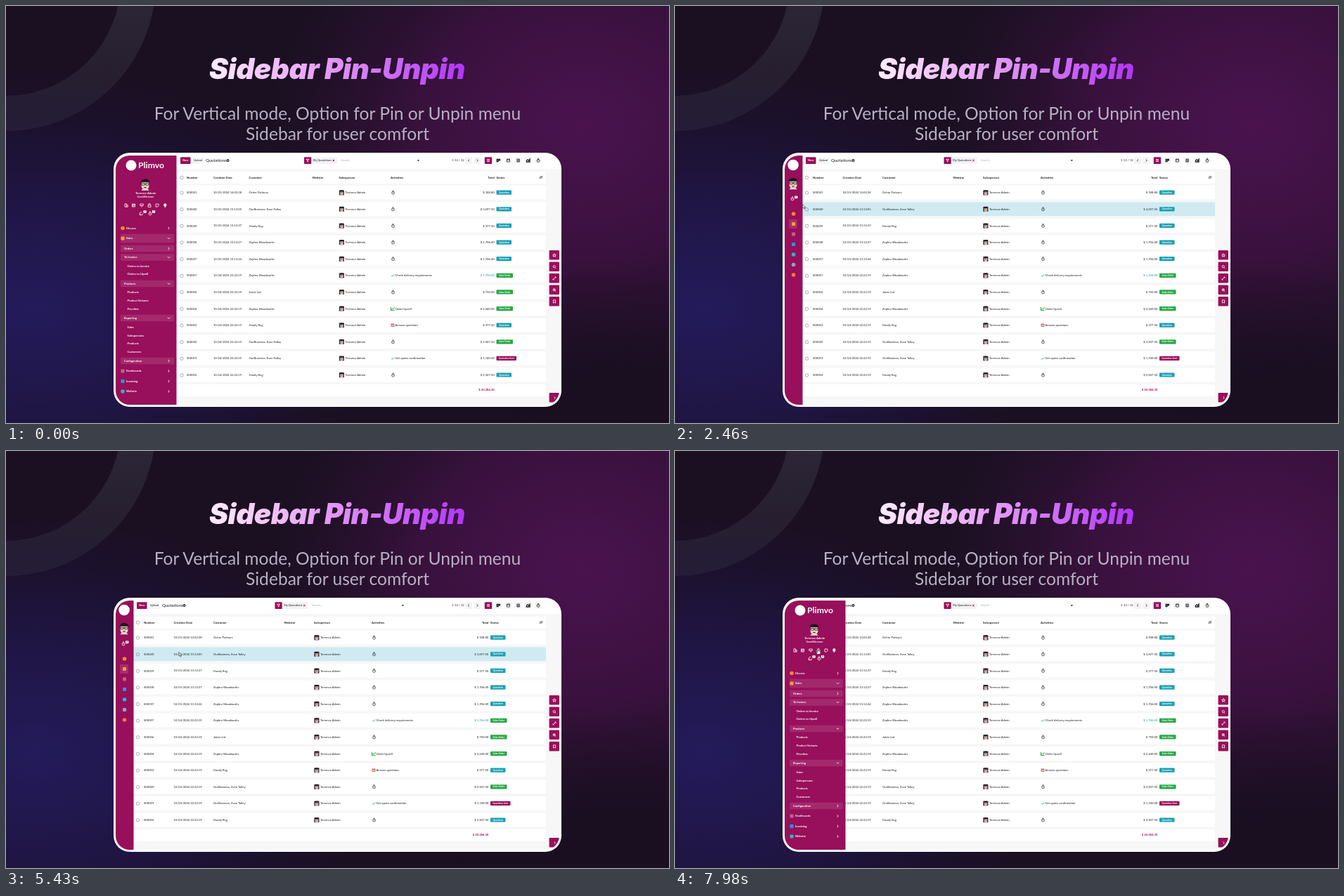
An HTML page that plays this animation: 943 px wide and 594 px high, repeating every 8000 ms.

```html
<!DOCTYPE html>
<html lang="en">
<head>
<meta charset="utf-8">
<title>Sidebar Pin-Unpin</title>
<style>
html, body { margin: 0; width: 100%; height: 100%; overflow: hidden; background: #1b1022; }
svg { display: block; width: 100vw; height: 100vh; font-family: Lato, sans-serif; }
.title { font: italic 900 40.5px Inter, sans-serif; letter-spacing: -.45px; }
.sub { font-size: 24.6px; fill: #b7b0c4; }
.b { font-weight: 700; }
.e { text-anchor: end; }
.m { text-anchor: middle; }
#ui { fill: #1c1c22; color: #222; }
.side { fill: #fff; color: #fff; }
</style>
</head>
<body>
<svg viewBox="0 0 943 594">
  <defs>
    <radialGradient id="plum"><stop offset="0" stop-color="#4a134f"/><stop offset=".5" stop-color="#461249" stop-opacity=".72"/><stop offset="1" stop-color="#34103a" stop-opacity="0"/></radialGradient>
    <radialGradient id="blue"><stop offset="0" stop-color="#241b5c"/><stop offset=".5" stop-color="#211853" stop-opacity=".65"/><stop offset="1" stop-color="#1b1040" stop-opacity="0"/></radialGradient>
    <radialGradient id="dark"><stop offset="0" stop-color="#180e20" stop-opacity=".6"/><stop offset="1" stop-color="#180e20" stop-opacity="0"/></radialGradient>
    <linearGradient id="ink" gradientUnits="userSpaceOnUse" x1="292" x2="651" y1="0" y2="0"><stop offset="0" stop-color="#ffebfd"/><stop offset=".45" stop-color="#e49cf3"/><stop offset="1" stop-color="#b136f8"/></linearGradient>
    <linearGradient id="ring" x1="0" y1="0" x2="0" y2="1"><stop offset=".5" stop-color="#84969c" stop-opacity=".17"/><stop offset="1" stop-color="#84969c" stop-opacity=".09"/></linearGradient>
    <clipPath id="screen"><rect x="156" y="213" width="631" height="355" rx="20"/></clipPath>
    <clipPath id="panel"><rect id="panelBox" x="156" y="213" height="355"/></clipPath>
    <g id="face">
      <path d="M-5 7.5C-4.5 4.5 4.5 4.5 5 7.5z" fill="#e9e4ea"/>
      <path d="M-4.9-3h9.8v4.5c0 6.4-9.8 6.4-9.8 0z" fill="#f2d3bd"/>
      <path d="M-5.8-.5C-8-9.5 8-9.5 5.8-.5L4.6-3.4H-4.6z" fill="#1a181e"/>
      <path d="M-4.4-1.6h3.6v2.2h-3.6zM.8-1.6h3.6v2.2H.8zM-.8-1H.8" fill="#fff" stroke="#222" stroke-width=".8"/>
      <path d="M-2.2 3.4Q0 2.4 2.2 3.4Q0 5.4-2.2 3.4" fill="#4a2d25"/>
    </g>
  </defs>
  <rect width="943" height="594" fill="#1b1022"/>
  <ellipse cx="820" cy="170" rx="440" ry="370" fill="url(#plum)"/>
  <ellipse cx="40" cy="430" rx="500" ry="340" fill="url(#blue)"/>
  <ellipse cx="850" cy="520" rx="260" ry="150" fill="url(#dark)"/>
  <circle cx="0" cy="-35" r="188" fill="none" stroke="url(#ring)" stroke-width="50"/>
  <text class="title m" x="471" y="104" fill="url(#ink)">Sidebar Pin-Unpin</text>
  <text class="sub m" x="471.5" y="162">For Vertical mode, Option for Pin or Unpin menu</text>
  <text class="sub m" x="471.5" y="191">Sidebar for user comfort</text>
  <rect x="153" y="209" width="637" height="362" rx="23" fill="#fff"/>
  <g id="ui" clip-path="url(#screen)"></g>
</svg>
<script>
const $ = id => document.getElementById(id);
const PLUM = '#980f5b', TEAL = '#1a9fb5', GREEN = '#28a745';

const text = (x, y, s, size = 4.2, cls = '', fill = '') =>
  `<text x="${x}" y="${y + size * .35}" font-size="${size}" class="${cls}" ${fill && `fill="${fill}"`}>${s}</text>`;
const rect = (x, y, w, h, fill, r = 0) =>
  `<rect x="${x}" y="${y}" width="${w}" height="${h}" rx="${r}" fill="${fill}"/>`;
const dot = (x, y, r, fill) => `<circle cx="${x}" cy="${y}" r="${r}" fill="${fill}"/>`;
const icon = (x, y, d, color = 'currentColor', w = .8) =>
  `<path transform="translate(${x} ${y})" d="${d}" fill="none" stroke="${color}" stroke-width="${w}"/>`;
const face = (x, y, k) => `<use href="#face" transform="translate(${x} ${y}) scale(${k})"/>`;
// Group that slides right by d while the sidebar is pinned
const slide = (d, s) => `<g class="slide" data-d="${d}">${s}</g>`;

const right = 'M-.9-1.6L.8 0L-.9 1.6', left = 'M.9-1.6L-.8 0L.9 1.6', down = 'M-1.6-.8L0 .8L1.6-.8';
const clock = 'M-.8-2.6h1.6M0-2.6v.8M2 .4a2 2 0 1 1-4 0a2 2 0 1 1 4 0M0 .5v-1.2';
const check = 'M-1.7 0L-.5 1.3L1.9-1.4', ring = 'M2.2 0a2.2 2.2 0 1 1-4.4 0a2.2 2.2 0 1 1 4.4 0';
const lens = 'M1.3-.3a1.6 1.6 0 1 1-3.2 0a1.6 1.6 0 1 1 3.2 0M.9 1L2.2 2.2';
const box = 'M-2-2h4v4h-4z', lines = 'M-2-1.4h4M-2 0h4M-2 1.4h4';
const star = 'M0-2.4L.7-.7L2.4-.6L1 .5L1.5 2.2L0 1.2L-1.5 2.2L-1 .5L-2.4-.6L-.7-.7z';
const lockBody = 'M-2-.4h4v2.8h-4zM-1.2-.4v-1.1a1.2 1.2 0 0 1 2.4 0';

// ---- Table ----
const buyers = {
  A: 'Ochre Parlours', Y: 'OurBusiness, Evan Tolley', R: 'Handy Rug', Z: 'Zephra Woodworks', J: 'Joists Ltd'
};
const early = '10/24/2024 22:22:19';
const rows = [
  ['41', '14:02:38', 'A', '188.80'], ['40', '13:13:05', 'Y', '3,697.50'],
  ['39', '13:12:37', 'R', '377.50'], ['38', '13:12:27', 'Z', '1,706.00'],
  ['37', '13:12:24', 'Z', '1,706.00'], ['07', '', 'Z', '1,706.00', 1, 'Check delivery requirements'],
  ['06', '', 'J', '750.00', 1], ['04', '', 'Z', '2,240.00', 1, 'Order Upsell'],
  ['03', '', 'R', '377.50', 0, 'Answer questions'], ['20', '', 'Y', '2,947.50', 1],
  ['19', '', 'Y', '1,740.00', 2, 'Get quote confirmation'], ['02', '', 'R', '2,947.50', 0]
];
const badges = [['Quotation', 21.5, TEAL], ['Sales Order', 23.5, GREEN], ['Quotation Sent', 28.5, PLUM]];
const rowY = i => 265.8 + i * 23.62;
const column = (d, x, name, cell, cls = '') =>
  slide(d, text(x, 244, name, 4.3, 'b ' + cls) + rows.map((r, i) => cell(r, rowY(i), i)).join(''));

function activity(note, y) {
  if (!note) return icon(523.5, y, clock, '#222', .7);
  const mark = note[0] == 'O' ? icon(523, y, 'M-2.6-2.4v4.8h5.2M-2 1.6L-.4-.4L.8.6L2.6-2', GREEN, 1)
    : note[0] == 'A' ? icon(523, y, 'M-2-1.8h4v3.6h-4zL0 .3L2-1.8', '#b5413c')
    : icon(523, y, check, '#178a54');
  return mark + text(526.5, y, note);
}

const table = rect(156, 213, 631, 355, '#f7f7f8') + rect(156, 213, 631, 19, '#fff') +
  rect(156, 236, 612, 17, '#fff') +
  rows.map((r, i) => `<rect class="row" x="156" y="${rowY(i) - 10}" width="612" height="19.8" fill="#fff"/>`).join('') +
  rect(156, 539, 612, 17, '#fff') +
  column(62.5, 187.5, '', (r, y) => icon(187.5, y + .3, ring, '#777', .6)) +
  slide(62.5, icon(187.5, 244.3, ring, '#777', .6)) +
  column(61, 196, 'Number', (r, y) => text(196, y, 'S000' + r[0])) +
  column(56.5, 238.5, 'Creation Date', (r, y) => text(238.5, y, r[1] ? '10/25/2024 ' + r[1] : early, 4.1)) +
  column(50.5, 295, 'Customer', (r, y) => text(295, y, buyers[r[2]])) +
  column(40, 395.5, 'Website', () => '') +
  column(35.5, 438, 'Salesperson', (r, y) => rect(438.3, y - 3.6, 7.2, 7.2, '#45323f', 1) + face(442, y, .46) + text(447, y, 'Terrence Admin')) +
  column(27, 520, 'Activities', (r, y) => activity(r[5], y)) +
  column(8.5, 686.3, 'Total', (r, y, i) => text(686.3, y, '$ ' + r[3], 4.2, 'e', i == 5 ? '#16979f' : ''), 'e') +
  column(8.5, 689, 'Status', (r, y) => {
    const [name, w, fill] = badges[r[4] || 0];
    return rect(689, y - 3.2, w, 6.2, fill, 1) + text(689 + w / 2, y - .1, name, 3.2, 'b m', '#fff');
  }) +
  slide(8.5, text(686.3, 547, '$ 20,384.30', 4.2, 'b e', PLUM)) +
  icon(761, 244, 'M-2-.9h4M1-2L2-.9M2 .9h-4M-1 2L-2 .9', '#222', .7);

// ---- Toolbar ----
const toolbar = slide(62, rect(186, 215.3, 14.5, 9.6, PLUM, 1) + text(193.2, 220, 'New', 4, 'b m', '#fff') +
    rect(203, 215.3, 16, 9.6, '#f6f6f7', 1) + text(211, 220, 'Upload', 4, 'm') + text(222, 220, 'Quotations', 6) +
    icon(253.5, 220, 'M1.4 0a1.4 1.4 0 1 1-2.8 0a1.4 1.4 0 1 1 2.8 0', '#222', 1.2)) +
  slide(41.5, rect(382.5, 215.3, 47, 9.6, '#f3f3f5', 1) + rect(382.5, 215.3, 10.2, 9.6, PLUM, 1) +
    icon(387.6, 220, 'M-2-1.8h4L.4.3v1.8L-.4 1.5V.3z', '#fff') + text(395, 220, 'My Quotations', 4) +
    icon(424.4, 220, 'M-1.2-1.2L1.2 1.2M1.2-1.2L-1.2 1.2', PLUM, 1) + text(435, 220, 'Search...', 4, '', '#aaa')) +
  slide(22, '<path d="M562.6 219.3h3.4l-1.7 2z"/>') +
  text(634, 220, '1-12 / 12', 4.2) +
  [[658, left], [670.5, right]].map(([x, d]) => rect(x - 5, 215.3, 10, 9.6, '#f3f3f5', 1) + icon(x, 220, d, '#333')).join('') +
  [lines, 'M-2-1.5h1.8v3H-2zM.6-1.5h1.6v1.4H.6z', box + 'M-2-1h4', 'M-1.8-2h3.6v4h-3.6zM-1-1h2M-1 .2h2M-1 1.2h2', 'M-2.4 2V0L-.8-1.2L.7.2L2.2-1.8V2z', clock]
    .map((d, i) => {
      const x = 686 + i * 14.2;
      return rect(x - 5.2, 215.3, 10.4, 9.6, i ? '#f6f6f7' : PLUM, 1) + icon(x, 220, d, i ? '#222' : '#fff', i == 1 || i == 4 ? 1.3 : .8);
    }).join('');

const tools = [star, lens, 'M-2 2L2-2M.4-2H2V-.4M-.4 2H-2V.4', lens + 'M-1.1-.3h1.6M-.3-1.1v1.6', 'M-1.6-2.2h3.2v4.4L0 .9L-1.6 2.2z']
  .map((d, i) => rect(772.6, 348 + i * 16.5, 14.4, 13.4, PLUM, 1) + icon(780, 355 + i * 16.5, d, '#fff')).join('') +
  rect(772.6, 551, 14.4, 13.4, PLUM, 1) + icon(780.5, 558, right, '#fff');

// ---- Sidebar ----
const apps = [['#f58a1f', 1], ['#f6a12a'], ['#b9667f'], ['#1d9be4'], ['#2cb6c6', 1], ['#83a7c9', 1], ['#ef7d32', 1]];
const app = (x, y, i) => apps[i][1] ? dot(x, y, 2.8, apps[i][0]) : rect(x - 2.5, y - 2.5, 5, 5, apps[i][0], .8);
const badge = (x, y) => rect(x - 2.2, y - 2, 4.4, 4, '#fff', 1.4) + text(x, y, '2', 3, 'b m', PLUM);

// Each entry: y, label, level, open
const menu = [
  [316.5, 'Discuss', 0], [331, 'Sales', 0, 1], [345.5, 'Orders', 1], [358, 'To Invoice', 1, 1],
  [370.5, 'Orders to Invoice', 2], [382, 'Orders to Upsell', 2], [395.5, 'Products', 1, 1],
  [408, 'Products', 2], [420, 'Product Variants', 2], [432, 'Pricelists', 2], [444.5, 'Reporting', 1, 1],
  [458, 'Sales', 2], [469.5, 'Salespersons', 2], [481, 'Products', 2], [492.5, 'Customers', 2],
  [505.5, 'Configuration', 1], [520, 'Dashboards', 0], [534.5, 'Invoicing', 0], [549, 'Website', 0]
];
let appNo = 0;
const menuItem = ([y, label, level, open]) => {
  const h = level ? 9.4 : 12.5;
  return (level == 1 || open ? rect(163, y - h / 2, 76, h, 'rgba(255,255,255,.11)', 1) : '') +
    (level ? '' : app(166, y, appNo++)) + text([171, 168, 172.5][level], y, label, 4.1, 'b') +
    (level < 2 ? icon(231.5, y, open ? down : right, '#fff', .9) : '');
};

const expanded = dot(178, 227, 7.5, '#fff') + text(188, 226.3, 'Plimvo', 12.2, 'b') + face(198, 254.5, 1.1) +
  text(198.5, 266.2, 'Terrence Admin', 4.2, 'b m') + text(198.5, 271.6, 'Good Afternoon', 3.3, 'b m') +
  icon(171, 284, 'M-2 2.2v-4.4h2.4v4.4zM.4-.6H2.2v2.8H.4') + icon(181.5, 284, box + 'M-2-.6h4M-.4-.6v2.6') +
  icon(193, 284, 'M-2.2-2h4.4v2.4h-4.4zM0 .4v2.2') +
  `<g id="shut">${icon(204, 284, lockBody + 'v1.1')}</g><g id="open">${icon(204, 284, lockBody)}</g>` +
  icon(215, 284, 'M-2-2h4v2.6L.6 2H-2z') +
  dot(226.3, 283.4, 2.1, '#fff') + rect(225.5, 285, 1.6, 1.8, '#fff') +
  icon(192.5, 295.5, 'M2.2 0a2.2 2.2 0 1 1-1.5-2M-2.2 0v2.2H0') + badge(197.6, 293) +
  icon(205, 295.5, clock) + badge(210, 293) + menu.map(menuItem).join('');

const collapsed = dot(0, 226.5, 7.8, '#fff') + face(0, 253, 1.1) + icon(-1, 274.5, clock, '#fff') + badge(4.2, 272.3) +
  rect(-6, 304, 12, 13, 'rgba(255,255,255,.13)', 1) + apps.map((a, i) => app(.5, 296 + i * 14.5, i)).join('');

$('ui').innerHTML = table + toolbar + tools +
  `<g class="side" clip-path="url(#panel)">${rect(156, 213, 90, 355, PLUM)}<g id="wide">${expanded}</g><g id="slim">${collapsed}</g></g>` +
  `<g id="cursor" stroke="#222" stroke-width=".6" stroke-linejoin="round" fill="#fff">
    <path id="arrow" d="M0 0V5.6L1.4 4.4L2.3 6.5L3.2 6.1L2.3 4.1H4.1z"/>
    <path id="hand" d="M-.7.6Q0-.5.7.6V3Q2 2.6 3.4 3.6V5.6L2.6 7.6H-1L-2.6 5Q-2.4 4-1.5 4.6L-.7 5z"/></g>`;

// ---- Motion ----
const path = [ // time, x, y of the cursor tip
  [90, 420, 400], [760, 203.5, 282], [1200, 203.5, 282], [1470, 268.5, 289.5], [1680, 292, 289],
  [1950, 292, 289], [2460, 181.5, 282.5], [2900, 190, 284], [4080, 192, 284], [4740, 192, 284],
  [4980, 243, 286.5], [5150, 270, 288], [5330, 270, 288], [5620, 184, 283], [5850, 181, 282],
  [6130, 181, 282], [6420, 250, 285], [6600, 260.5, 285], [6800, 264, 285], [7160, 180, 284],
  [7600, 203.5, 282], [8000, 203.5, 282]
];
const toggles = [[-500, 1], [1500, 0], [2480, 1], [5010, 0], [5560, 1], [6380, 0], [7130, 1]]; // time, open
const clamp = v => Math.max(0, Math.min(1, v));
const smooth = v => v * v * (3 - 2 * v);
const show = (id, on) => $(id).setAttribute('visibility', on ? 'visible' : 'hidden');
const slides = document.querySelectorAll('.slide');
const hoverRow = document.querySelectorAll('.row')[1];

function cursorAt(t) {
  const i = Math.max(1, path.findIndex(k => k[0] > t));
  const [a, b] = [path[i - 1], path[i]];
  const k = smooth(clamp((t - a[0]) / (b[0] - a[0])));
  return [a[1] + (b[1] - a[1]) * k, a[2] + (b[2] - a[2]) * k];
}

function draw() {
  const t = performance.now() % 8000;
  const pinned = 1 - smooth(clamp((t - 860) / 240));
  slides.forEach(g => g.setAttribute('transform', `translate(${g.dataset.d * pinned} 0)`));

  const [start, open] = toggles.filter(k => k[0] <= t).pop();
  const done = 1 - (1 - clamp((t - start) / 300)) ** 2;
  const width = 25.5 + 61 * (open ? done : 1 - done);
  $('panelBox').setAttribute('width', width);
  $('slim').setAttribute('transform', `translate(${155.3 + width / 2} 0)`);
  show('wide', open);
  show('slim', !open);
  show('shut', open && t < 850);
  show('open', open && t >= 850);
  hoverRow.setAttribute('fill', open ? '#fff' : '#cfebf1');

  // The pointer becomes a hand over table rows and over the lock
  const [x, y] = cursorAt(t);
  const hand = x > 248 || (open && Math.abs(x - 203.5) < 4);
  $('cursor').setAttribute('transform', `translate(${x} ${y})`);
  show('hand', t >= 90 && hand);
  show('arrow', t >= 90 && !hand);
  requestAnimationFrame(draw);
}
draw();
</script>
</body>
</html>
```
